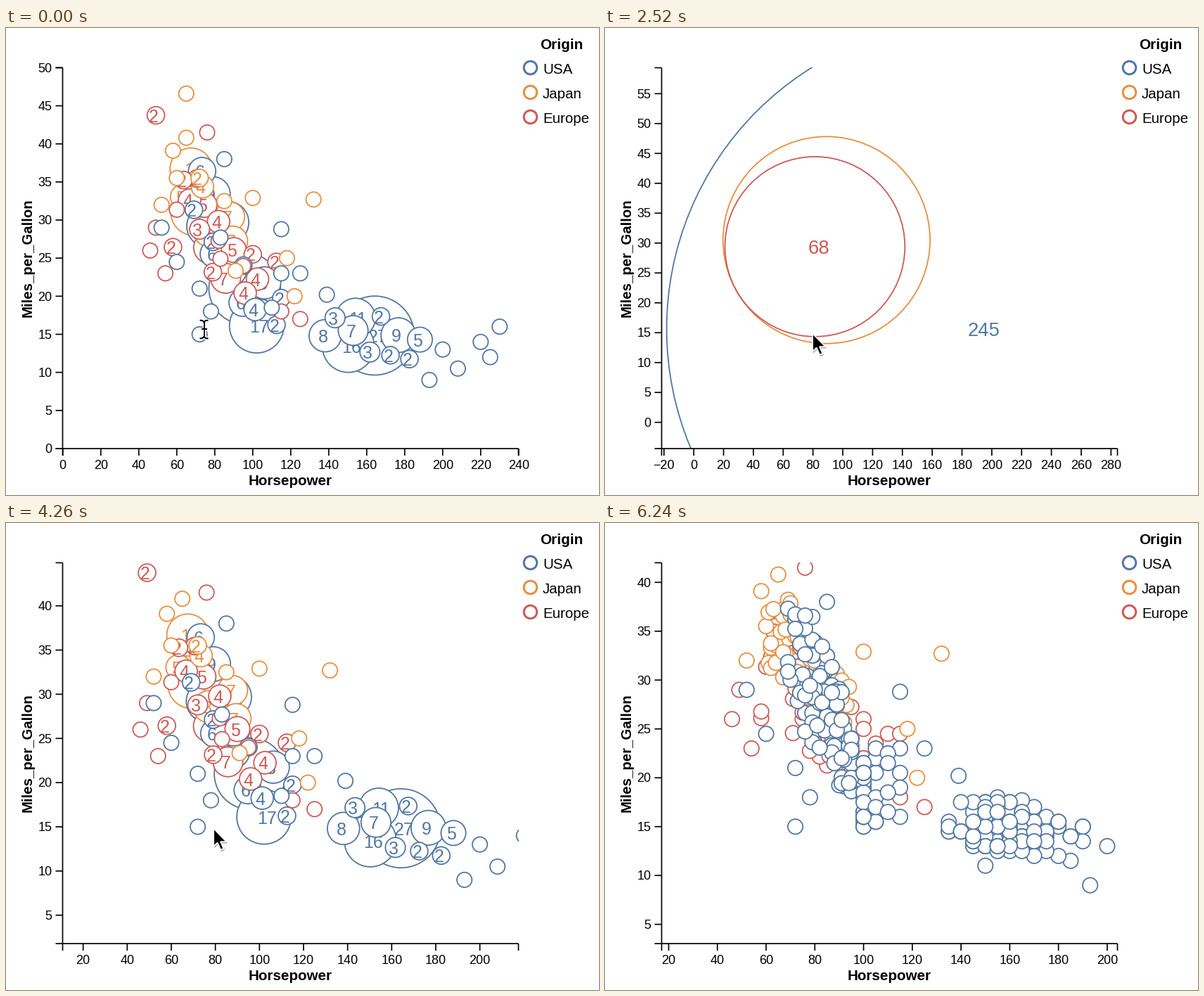
Recreate the animation shown at these times as a matplotlib script. Size 843 px wide and 664 px high, loop 6300 ms.

```python
import numpy as np
import matplotlib.pyplot as plt
from matplotlib.animation import FuncAnimation
from matplotlib.collections import LineCollection
from matplotlib.patches import Circle, Polygon, Rectangle

W, H, DPI = 843, 664, 100
LEFT, RIGHT, TOP, BOTTOM = 80, 728, 56, 597.5
UNIT_X, UNIT_Y = 2.7, 10.83   # pixels per data unit at scale 1
STEP, FRAMES = 60, 105
PX = 72 / DPI
BLUE, ORANGE, RED = "#5177a3", "#e78f3e", "#cd5a57"
rng = np.random.default_rng(7)

plt.rcParams["font.family"] = "Liberation Sans"
fig = plt.figure(figsize=(W / DPI, H / DPI), dpi=DPI, facecolor="white")
ax = fig.add_axes([0, 0, 1, 1])
ax.set(xlim=(-.5, W - .5), ylim=(H - .5, -.5))
ax.axis("off")
plot_area = Rectangle((LEFT, TOP), RIGHT - LEFT, BOTTOM - TOP,
                      fc="none", ec="none")
ax.add_patch(plot_area)


# ---- zoom around the pointer, near the point (80, 15)
def projection(t):
    k = np.interp(t, [240, 1740, 2520, 3720, 4620, 5340, 6240],
                  [1, .9105, .7846, 1.0005, 1.267, 1.2798, 1.2828])
    x80 = 296.3 + 5.3 * (k - 1)
    y15 = np.interp(t, [0, 1740, 4620], [435, 433.3, 431.2])
    return (lambda hp: x80 + (hp - 80) * UNIT_X * k,
            lambda mpg: y15 - (mpg - 15) * UNIT_Y * k)


# ---- data: random points in a band around a trend, plus a few outliers
def scatter(color, hp, band, outliers):
    at, mid, spread = np.transpose(band)
    hp = np.where(hp > 95, 5 * np.round(hp / 5), np.round(hp))
    mpg = (np.interp(hp, at, mid)
           + np.interp(hp, at, spread) * rng.uniform(-1, 1, len(hp)))
    mpg = np.where(hp > 95, np.round(mpg * 2) / 2, mpg)
    return [(h, m, color) for h, m in [*outliers, *zip(hp, mpg)]]


europe = scatter(
    RED, rng.triangular(56, 74, 120, 61),
    [(56, 31, 5), (70, 30.5, 6), (90, 24, 4), (115, 21, 4.5)],
    [(76, 41.5), (46, 26), (54, 23), (49, 29), (50, 44.3), (48, 43.2),
     (125, 17)])
japan = scatter(
    ORANGE, rng.triangular(57, 68, 99, 71),
    [(57, 35, 4), (68, 34.5, 4.5), (80, 31, 4.5), (99, 24, 3.5)],
    [(65, 46.6), (132, 32.7), (100, 32.9), (52, 32), (58, 39.1), (65, 40.8),
     (122, 20), (118, 25)])
usa_hp = np.concatenate([rng.triangular(62, 92, 117, 135),
                         rng.triangular(128, 146, 202, 94)])
usa = scatter(
    BLUE, usa_hp,
    [(62, 35, 5), (82, 29, 7), (92, 23.5, 5), (100, 18.5, 3.5),
     (110, 20, 5), (130, 16, 2.5), (150, 15.5, 2.8), (200, 13, 2.5)],
    [(52, 29), (60, 24.5), (72, 15), (72, 21), (78, 18), (115, 28.8),
     (125, 23), (85, 38), (139, 20.2), (165, 17.7), (150, 11), (193, 9),
     (208, 10.5), (220, 14), (225, 12), (230, 16)])


def cluster(pts, reach):
    groups = []
    for p in pts:
        for g in groups:
            hp, mpg, color = g[0]
            near = np.hypot((hp - p[0]) * UNIT_X, (mpg - p[1]) * UNIT_Y)
            if color == p[2] and near < reach:
                g.append(p)
                break
        else:
            groups.append([p])
    groups.sort(key=len, reverse=True)
    return [(*np.mean([q[:2] for q in g], axis=0), len(g), g[0][2])
            for g in groups]


# later groups mostly on top, with some mixing
ranked = [(i + rng.uniform(0, 1.3), p)
          for i, group in enumerate((europe, japan, usa)) for p in group]
cars = [p for _, p in sorted(ranked)]
points = [(hp, mpg, 1, color) for hp, mpg, color in cars]
clusters = cluster(cars, 22)
totals = [(188.4, 15.65, len(usa), BLUE), (89.1, 30.5, len(japan), ORANGE),
          (81.3, 29.4, len(europe), RED)]


# ---- drawing helpers
def label(x, y, s, size, **kw):
    return ax.text(x, y + .345 * size, s, fontsize=size * PX,
                   va="baseline", **kw)


class Mark:
    def __init__(self, hp, mpg, n, color, z):
        self.hp, self.mpg = hp, mpg
        self.dot = Circle((0, 0), 8.9 + 1.75 * n, fc="white", ec=color,
                          lw=1.8 * PX, zorder=z)
        ax.add_patch(self.dot)
        self.dot.set_clip_path(plot_area)
        self.text = None
        if n > 1:
            self.size = 25 if n < 40 else 27.5
            self.text = label(0, 0, str(n), self.size, color=color, zorder=z,
                              clip_on=True)
            self.text.set_clip_path(plot_area)

    def show(self, on):
        self.dot.set_visible(on)
        if self.text:
            self.text.set_visible(on)

    def place(self, sx, sy):
        x, y = sx(self.hp), sy(self.mpg)
        self.dot.center = x, y
        if self.text:
            self.text.set_position((x - 10, y + 1 + .345 * self.size))


def layer(rows):
    return [Mark(*row, z=2 + i / 1000) for i, row in enumerate(rows)]


layers = {"points": layer(points), "clusters": layer(clusters),
          "totals": layer(totals)}


def level(t):
    if t < 900 or 4080 <= t < 4380:
        return "clusters"
    return "totals" if t < 4080 else "points"


# ---- axes and legend
ticks = LineCollection([], colors="black", lw=1.7 * PX, zorder=4)
ticks.set_snap(False)
ax.add_collection(ticks)


def tick_text(v):
    return str(v).replace("-", "\u2212")


x_labels = {v: label(0, 620, tick_text(v), 18, ha="center")
            for v in range(-40, 301, 20)}
y_labels = {v: label(65, 0, tick_text(v), 18, ha="right")
            for v in range(-10, 71, 5)}

label(404, 642.5, "Horsepower", 20.7, ha="center", weight="bold")
ax.text(36, 326, "Miles_per_Gallon", fontsize=20.4 * PX, weight="bold",
        rotation=90, rotation_mode="anchor", ha="center", va="baseline")
label(789, 22.5, "Origin", 20.8, ha="center", weight="bold")
for i, (name, color) in enumerate((("USA", BLUE), ("Japan", ORANGE),
                                   ("Europe", RED))):
    ax.add_patch(Circle((745, 56 + 35 * i), 9.3, fc="white", ec=color,
                        lw=3 * PX))
    label(762.5, 57.5 + 35 * i, name, 20.5)


def draw_axes(sx, sy):
    xs, ys = [LEFT, RIGHT], [TOP, BOTTOM]
    for v, txt in x_labels.items():
        x = sx(v)
        on = LEFT - 1 <= x <= RIGHT + 1
        txt.set_visible(on)
        txt.set_x(x)
        if on:
            xs.append(x)
    for v, txt in y_labels.items():
        y = sy(v)
        on = TOP - 1 <= y <= BOTTOM + 1
        txt.set_visible(on)
        txt.set_y(y + .345 * 18)
        if on:
            ys.append(y)
    ticks.set_segments(
        [[(LEFT, TOP), (LEFT, BOTTOM)], [(LEFT, BOTTOM), (RIGHT, BOTTOM)]]
        + [[(x, BOTTOM), (x, BOTTOM + 10)] for x in xs]
        + [[(LEFT - 10, y), (LEFT, y)] for y in ys])


# ---- pointers
ARROW = np.array([(0, 0), (0, 25), (5.5, 20), (10, 30), (14, 28.3),
                  (9.7, 18.5), (18, 18.5)])
SERIF = np.array([(-6, -13), (-2, -12.5), (0, -10), (2, -12.5), (6, -13)])
BEAM = [np.array([(0, -10), (0, 10)]), np.array([(-4, 0), (4, 0)]),
        SERIF, SERIF * (1, -1)]
shadow = ax.add_patch(Polygon(ARROW, fc="black", ec="black", lw=2 * PX,
                              alpha=.18, zorder=5))
arrow = ax.add_patch(Polygon(ARROW, fc="black", ec="white", lw=1.6 * PX,
                             zorder=6))
beam = [ax.add_collection(LineCollection([], colors=c, lw=w * PX, zorder=z))
        for c, w, z in (("white", 4.5, 5), ("black", 2, 6))]


def draw_pointer(t):
    x = np.interp(t, [480, 1740], [281, 294.7])
    y = np.interp(t, [480, 1740, 2520], [428, 420, 434])
    typing = t < 600
    for b in beam:
        b.set_visible(typing)
        b.set_segments([p + (x, y) for p in BEAM])
    for a, dx, dy in ((arrow, 0, 0), (shadow, 1, 2)):
        a.set_visible(not typing and t < 6060)
        a.set_xy(ARROW + (x + dx, y + dy))


def update(frame):
    t = frame * STEP
    sx, sy = projection(t)
    draw_axes(sx, sy)
    current = level(t)
    for name, marks in layers.items():
        for m in marks:
            m.show(name == current)
            if name == current:
                m.place(sx, sy)
    draw_pointer(t)
    return []


anim = FuncAnimation(fig, update, frames=FRAMES, interval=STEP,
                     init_func=lambda: update(0), repeat=True, repeat_delay=0,
                     blit=False)
plt.show()
```
